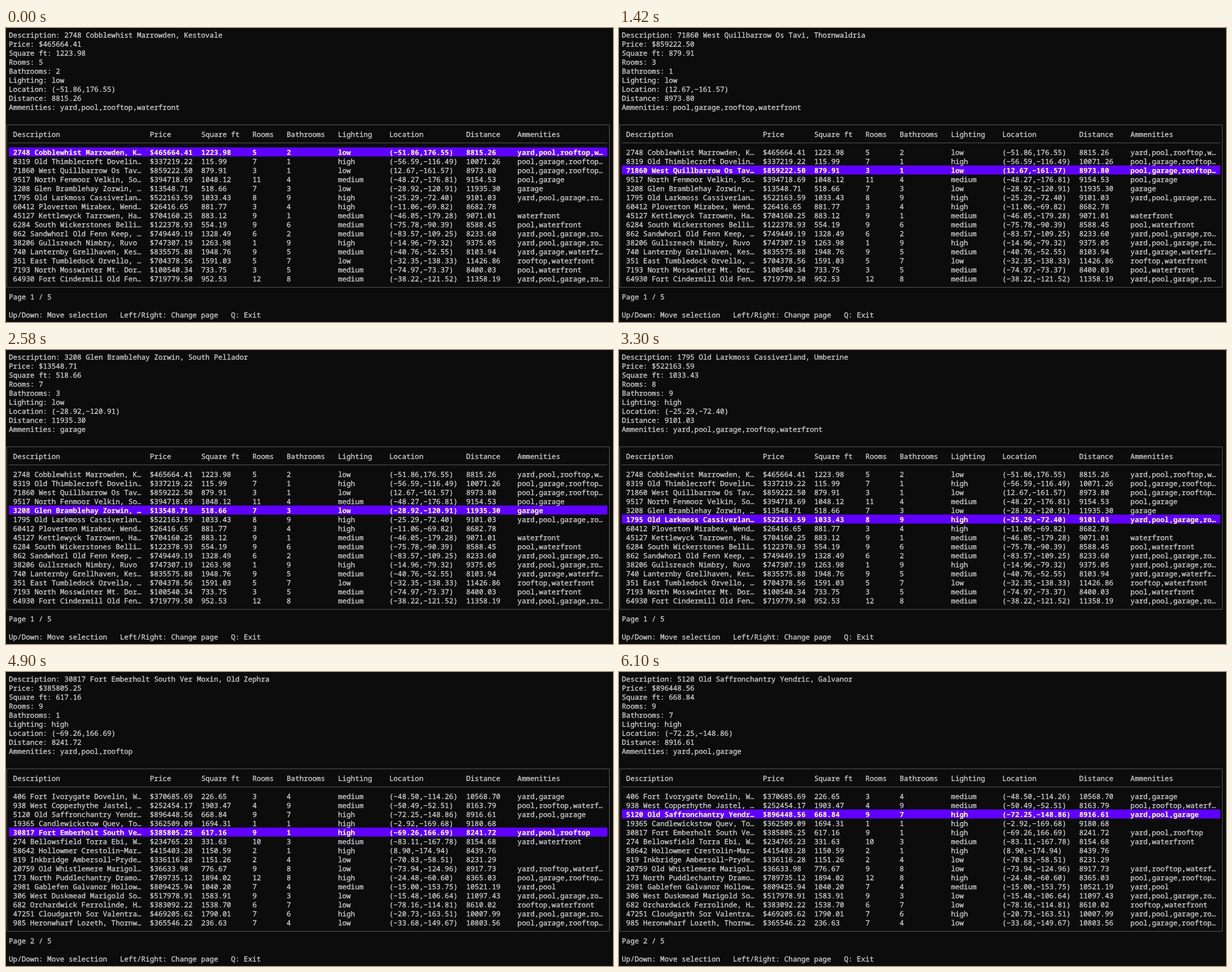
Animation, 1075 px wide and 521 px high, one loop 8 s. Source, as an HTML page:

```html
<!DOCTYPE html>
<html lang="en">
<head>
<meta charset="utf-8">
<title>Listings</title>
<style>
  html, body { margin: 0; width: 100%; height: 100%; overflow: hidden; background: #0c0c0c; }
  svg { display: block; width: 1075px; height: 521px; }
  text {
    font: 12.617px "Noto Sans Mono", "DejaVu Sans Mono", monospace;
    font-variant-ligatures: none;
    text-rendering: geometricPrecision;
    white-space: pre;
    fill: #cccccc;
    stroke: #cccccc;
    stroke-width: 0.35;
  }
  .on text { font-weight: 600; fill: #ffffaf; stroke: none; }
  .line { fill: none; stroke: #585858; stroke-width: 1; }
</style>
</head>
<body>
<svg id="stage" viewBox="0 0 1075 521" xmlns="http://www.w3.org/2000/svg">
  <rect width="1075" height="521" fill="#0c0c0c"/>
  <path id="frame" class="line"/>
  <rect id="bar" x="5" width="1060" height="16" fill="#5f00ff"/>
</svg>
<script>
const CELL = 7.57, LINE = 16, LEFT = 5, TOP = 3.6, BASE = 13;
const FIRST_ROW = 13, LOOP = 8000;

const names = ['Description', 'Price', 'Square ft', 'Rooms', 'Bathrooms',
  'Lighting', 'Location', 'Distance', 'Ammenities'];
const widths = [30, 10, 10, 6, 10, 10, 16, 10, 20];
const extras = { y: 'yard', p: 'pool', g: 'garage', r: 'rooftop', w: 'waterfront' };
const levels = { l: 'low', m: 'medium', h: 'high' };

const pages = [`
2748 Cobblewhist Marrowden, Kestovale|465664.41|1223.98|5|2|l|-51.86,176.55|8815.26|yprw
8319 Old Thimblecroft Dovelin, Ambrava|337219.22|115.99|7|1|h|-56.59,-116.49|10071.26|pgrw
71860 West Quillbarrow Os Tavi, Thornwaldria|859222.50|879.91|3|1|l|12.67,-161.57|8973.80|pgrw
9517 North Fenmoor Velkin, Sorrelmark|394718.69|1048.12|11|4|m|-48.27,-176.81|9154.53|pg
3208 Glen Bramblehay Zorwin, South Pellador|13548.71|518.66|7|3|l|-28.92,-120.91|11935.30|g
1795 Old Larkmoss Cassiverland, Umberine|522163.59|1033.43|8|9|h|-25.29,-72.40|9101.03|ypgrw
60412 Ploverton Mirabex, Wendoria|26416.65|881.77|3|4|h|-11.06,-69.82|8682.78|
45127 Kettlewyck Tarrowen, Havelmoor|704160.25|883.12|9|1|m|-46.05,-179.28|9071.01|w
6284 South Wickerstones Bellimora, Zendale|122378.93|554.19|9|6|m|-75.78,-90.39|8588.45|pw
862 Sandwhorl Old Fenn Keep, Ambrava|749449.19|1328.49|6|2|m|-83.57,-109.25|8233.60|ypgrw
38206 Gullsreach Nimbry, Ruvo|747307.19|1263.98|1|9|h|-14.96,-79.32|9375.05|ypgrw
740 Lanternby Grellhaven, Kestovale|835575.88|1948.76|9|5|m|-40.76,-52.55|8103.94|ygw
351 East Tumbledock Orvello, Sorrelmark|704378.56|1591.03|5|7|l|-32.35,-138.33|11426.86|rw
7193 North Mosswinter Mt. Dorrelow, Umberine|100540.34|733.75|3|5|m|-74.97,-73.37|8400.03|pw
64930 Fort Cindermill Old Fenn Keep, Zendale|719779.50|952.53|12|8|m|-38.22,-121.52|11358.19|ypgrw
`, `
406 Fort Ivorygate Dovelin, Wendoria|370685.69|226.65|3|4|m|-48.50,-114.26|10568.70|yg
938 West Copperhythe Jastel, Ruvo|252454.17|1903.47|4|9|m|-50.49,-52.51|8163.79|prw
5120 Old Saffronchantry Yendric, Galvanor|896448.56|668.84|9|7|h|-72.25,-148.86|8916.61|ypg
19365 Candlewickstow Quev, Tolvia|362509.09|1694.31|1|1|h|-2.92,-169.68|9180.68|
30817 Fort Emberholt South Ver Moxin, Old Zephra|385805.25|617.16|9|1|h|-69.26,166.69|8241.72|ypr
274 Bellowsfield Torra Ebi, Wexal|234765.23|331.63|10|3|m|-83.11,-167.78|8154.68|yw
58642 Hollowmer Crestolin-Marvick, Zendale|415403.28|1150.59|2|1|h|8.90,-174.94|8439.76|
819 Inkbridge Ambersoll-Prydewick, Ruvo|336116.28|1151.26|2|4|l|-70.83,-58.51|8231.29|
20759 Old Whistlemere Marigold Sound, Tolvia|36633.98|776.67|9|8|l|-73.94,-124.96|8917.73|yrw
173 North Puddlechantry Dramovick, Galvanor|789735.12|1894.02|12|8|h|-24.48,-60.60|8365.03|pgrw
2981 Gablefen Galvanor Hollows, Wendoria|809425.94|1040.20|7|4|m|-15.00,-153.75|10521.19|yp
306 West Duskmead Marigold Sound, Umberine|517978.91|1583.91|9|3|l|-15.48,-106.64|11097.43|ypgrw
682 Orchardwick Ferrolinde, Havelmoor|383092.22|1538.70|6|7|l|-78.16,-114.81|8610.02|rw
47251 Cloudgarth Sor Valentrano, Ambrava|469205.62|1790.01|7|6|h|-20.73,-163.51|10007.99|ypgrw
985 Heronwharf Lozeth, Thornwaldria|365546.22|236.63|7|4|l|-33.68,-149.67|10803.56|pgrw
`].map(page => page.trim().split('\n').map(parse));

// [start ms, page, selected row]
const steps = [[0, 0, 0], [500, 0, 1], [1420, 0, 2], [2020, 0, 3], [2580, 0, 4],
  [3300, 0, 5], [3900, 1, 5], [4900, 1, 4], [5500, 1, 3], [6100, 1, 2]];

function parse(line) {
  const f = line.split('|');
  f[1] = '$' + f[1];
  f[5] = levels[f[5]];
  f[6] = `(${f[6]})`;
  f[8] = [...f[8]].map(c => extras[c]).join(',');
  return f;
}

const svg = document.getElementById('stage');
const bar = document.getElementById('bar');

const colX = col => LEFT + col * CELL;
const rowY = row => TOP + row * LINE;

function add(tag, parent) {
  return parent.appendChild(document.createElementNS(svg.namespaceURI, tag));
}

function write(node, s) {
  node.textContent = s.replace(/-/g, '\u2212');
}

function label(col, row, s = '', parent = svg) {
  const node = add('text', parent);
  node.setAttribute('x', colX(col));
  node.setAttribute('y', rowY(row) + BASE);
  write(node, s);
  return node;
}

function tableRow(row, cells) {
  const g = add('g', svg);
  let col = 1;
  const nodes = widths.map((w, i) => {
    const node = label(col, row, cells[i], g);
    col += w + 2;
    return node;
  });
  return { g, nodes };
}

const cut = (s, w) => s.length > w ? s.slice(0, w - 1) + '…' : s;

// Border lines run through the middle of their character cells.
document.getElementById('frame').setAttribute('d',
  `M${colX(-0.5)} ${rowY(10.5)}H${colX(140.5)}V${rowY(28.5)}H${colX(-0.5)}Z` +
  `M${colX(0)} ${rowY(12.5)}H${colX(140)}`);

const details = names.map((_, i) => label(0, i));
tableRow(11, names);
const rows = pages[0].map((_, i) => tableRow(FIRST_ROW + i, []));
const footer = label(0, 29);
label(0, 31, 'Up/Down: Move selection   Left/Right: Change page   Q: Exit');

function show([, page, pick]) {
  const list = pages[page];
  details.forEach((node, i) => write(node, `${names[i]}: ${list[pick][i]}`));
  rows.forEach(({ g, nodes }, r) => {
    g.setAttribute('class', r === pick ? 'on' : '');
    nodes.forEach((node, i) => write(node, cut(list[r][i], widths[i])));
  });
  bar.setAttribute('y', rowY(FIRST_ROW + pick));
  write(footer, `Page ${page + 1} / 5`);
}

let current;
function draw(t) {
  const step = steps.filter(s => s[0] <= t).pop();
  if (step !== current) show(current = step);
}

const start = performance.now();
function tick() {
  draw((performance.now() - start) % LOOP);
  requestAnimationFrame(tick);
}
tick();
</script>
</body>
</html>
```
